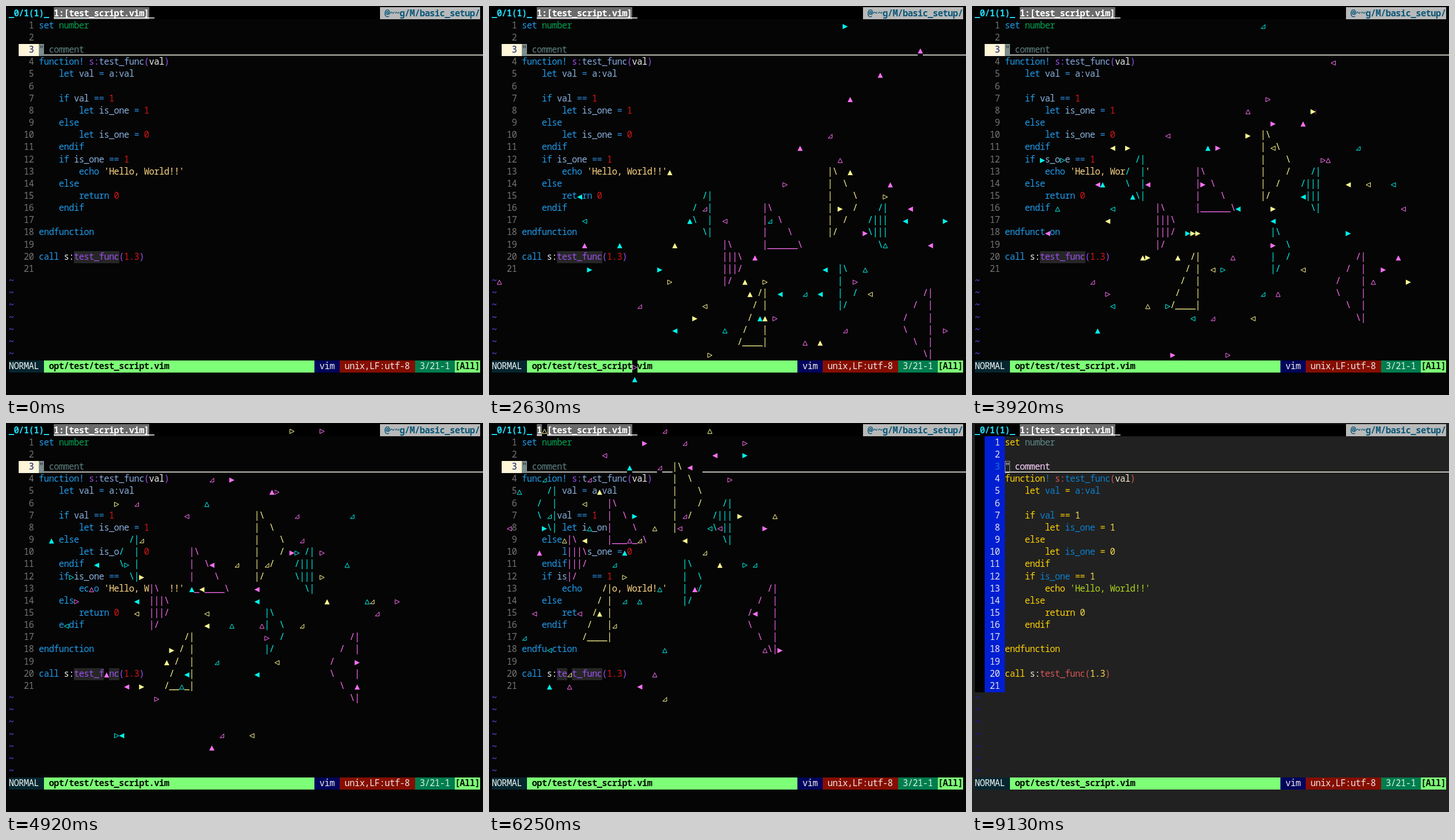
Write an HTML page with a canvas that moves like this. It is 829 by 676 pixels and loops after 9.18 s.

```html
<!DOCTYPE html>
<html>
<head>
<meta charset="utf-8">
<style>
html, body { margin: 0; width: 100%; height: 100%; overflow: hidden; background: #050505; }
canvas { display: block; }
</style>
</head>
<body>
<canvas id="stage" width="829" height="676"></canvas>
<script>
const ctx = document.getElementById('stage').getContext('2d');
const LOOP = 9180, TYPE_COLON = 1220, TYPE_U = 1340, START = 1750, END = 6750, BLUR = 8900;
const COLS = 94, ROWS = 32, CW = 8.71, RH = 21.16;
const X = c => Math.round(5 + CW * c), Y = r => Math.round(2.3 + RH * r);

// "~" starts a token; the next letter names its style
const code = [
  '~Kset ~Onumber', '', '~C" comment',
  '~Kfunction~B! ~Ss:~Ftest_func~P(~Aval~P)',
  '~K    let ~Vval ~E= ~Va:val', '',
  '~K    if ~Vval ~E== ~N1',
  '~K        let ~Vis_one ~E= ~N1',
  '~K    else',
  '~K        let ~Vis_one ~E= ~N0',
  '~K    endif',
  '~K    if ~Vis_one ~E== ~N1',
  "~K        echo ~T'Hello, World!!'",
  '~K    else',
  '~K        return ~N0',
  '~K    endif', '',
  '~Kendfunction', '',
  '~Kcall ~As:~Mtest_func~P(~N1.3~P)', ''
];
const dark = {
  bg: '#050505', num: '#747474', numBg: '#050505', curNum: '#101c78', curBg: '#fff5d7',
  tilde: '#6050ff', mark: '#262626', K: '#209ae8', O: '#04a052', C: '#5f7f80', B: '#209ae8',
  S: '#9b50ee', F: '#86a8de', P: '#9b50ee', A: '#ededed', V: '#8ab0dc', E: '#2a8fe4',
  N: '#d41616', T: '#ffd787', M: '#9b50ee'
};
const blue = {
  bg: '#212121', num: '#e6e6e6', numBg: '#001ed2', curNum: '#0b78e0', curBg: '#001ed2',
  tilde: '#1414c8', mark: '#212121', K: '#fdd000', O: '#5f8787', C: '#ffd7ff', B: '#0a80d0',
  S: '#d75555', F: '#0a80d0', P: '#d75555', A: '#f2ead0', V: '#0a80d0', E: '#fdd000',
  N: '#f5d84a', T: '#afd71c', M: '#d75555'
};
const ink = { C: '#00f6ee', M: '#ff70f5', Y: '#fffb92' };

// large outlines: colour, column, row, lines
const outlines = [
  ['C', 36, 14, ['  /|', '/  |', '\\  |', '  \\|']],
  ['Y', 63, 12, ['|\\    ', '|  \\  ', '|    \\', '|    /', '|  /  ', '|/    ']],
  ['C', 71, 15, ['  /|', '/|||', '\\|||', '  \\|']],
  ['M', 50, 15, ['|\\      ', '|  \\    ', '|    \\  ', '|______\\']],
  ['M', 42, 18, ['|\\  ', '|||\\', '|||/', '|/  ']],
  ['C', 65, 20, ['|\\  ', '|  \\', '|  /', '|/  ']],
  ['Y', 45, 22, ['    /|', '   / |', '  /  |', ' /   |', '/____|']],
  ['M', 78, 22, ['    /|', '  /  |', '/    |', '\\    |', '  \\  |', '    \\|']]
];

// small triangles by row: column, colour, glyph
const confetti = {
  2: '65C◁', 4: '76M◿ 81M▷', 8: '67M▲', 9: '63M△', 10: '53M△', 11: '34Y◀ 68M▶',
  12: '57Y◀ 88Y▷', 13: '58M▶ 67Y▲ 74M◁', 14: '17C▷ 71M◁ 74Y▲',
  15: '33Y◀ 34C◿ 44M△ 64Y◀ 82Y△ 93C◿', 16: '18C▷ 41M◁ 52C▶ 86C▲',
  17: '25C▲ 51M△ 77M◿', 18: '72C◁ 90M▲',
  19: '0M◿ 15C◁ 29Y◀ 30M▷ 60C▶ 69M▷ 70C◀ 78C◁', 20: '19M▶ 32C▲ 50C▲',
  21: '47Y▷ 48Y▷ 83M◿', 22: '38Y◁ 53Y△ 58C▶ 70Y△ 92Y▶', 23: '26M◀ 56M◿',
  24: '47Y▶ 52M◁ 65C▷ 66M▶ 85M◿', 25: '33C▷ 37Y◀', 26: '91M△',
  27: '26M▲ 48C◿ 59Y▶', 28: '36Y◀ 41C◁', 29: '46M◀', 30: '27C◿', 31: '62M△'
};
const MID_COL = 60, MID_ROW = 18;
const GLYPHS = '◁▷△◿◀▶▲';
const points = {
  '◀': [4.5, -4.5, 4.5, 4.5, -4.5, 0], '▶': [-4.5, -4.5, -4.5, 4.5, 4.5, 0],
  '▲': [-4.5, 4.5, 4.5, 4.5, 0, -4.5], '◿': [-4, 4, 4, 4, 4, -4]
};
const solid = { '◁': '◀', '▷': '▶', '△': '▲', '◿': '◿' };

const rnd = (i, k) => {
  const v = Math.sin(i * 127.1 + k * 311.7) * 43758.5453;
  return v - Math.floor(v);
};
const bits = Object.entries(confetti).flatMap(([row, list]) => list.split(' ').map(s => {
  const [, col, tint, glyph] = s.match(/(\d+)(\w)(.)/);
  return { col: +col, row: +row, tint, glyph };
}));

function box(c, r, n, color) {
  ctx.fillStyle = color;
  ctx.fillRect(X(c), Y(r), X(c + n) - X(c), Y(r + 1) - Y(r));
}

function put(c, r, text, fg, bg, bold) {
  if (bg) box(c, r, text.length, bg);
  ctx.fillStyle = fg;
  ctx.font = `${bold ? '600 ' : ''}15.5px "Noto Sans Mono", "DejaVu Sans Mono", monospace`;
  ctx.textAlign = 'center';
  [...text].forEach((ch, i) => {
    if (ch !== ' ') ctx.fillText(ch, 5 + CW * (c + i + 0.5), 17.6 + RH * r);
  });
}

function line(x, y, w, color) {
  ctx.fillStyle = color;
  ctx.fillRect(x, y, w, 1.5);
}

function drawBars() {
  box(0, 0, COLS, '#000');
  put(0, 0, '_0/1(1)_', '#22d8f4', null, true);
  put(9, 0, '1:[test_script.vim]', '#fff', '#6b6b6b', true);
  line(X(9), 20, X(29) - X(9), '#fff');
  put(74, 0, ' @~~g/M/basic_setup/', '#0b5878', '#b9b9b9', true);
  put(0, 29, 'NORMAL ', '#e8f4f4', '#06262f');
  put(7, 29, ' opt/test/test_script.vim'.padEnd(54), '#061006', '#7dff77', true);
  put(61, 29, ' vim ', '#f0f0f0', '#00045c');
  put(66, 29, ' unix,LF:utf-8 ', '#f0e4e0', '#850e00');
  put(81, 29, ' 3/21-1 ', '#d8f4e4', '#007d4e');
  put(89, 29, '[All]', '#061006', '#7dff77', true);
}

function drawBuffer(pal) {
  code.forEach((src, i) => {
    const row = i + 1, current = row === 3;
    if (pal === blue) box(0, row, 2, '#000');
    put(2, row, String(row).padStart(3) + ' ', current ? pal.curNum : pal.num,
      current ? pal.curBg : pal.numBg);
    let col = 6;
    src.split('~').slice(1).forEach(tok => {
      const text = tok.slice(1);
      put(col, row, text, pal[tok[0]], tok[0] === 'M' ? pal.mark : null);
      col += text.length;
    });
  });
  line(pal === dark ? X(2) : X(6), 84.5, 829, '#f6f6ec');
  for (let r = 22; r < 29; r++) put(0, r, '~', pal.tilde);
}

function drawCursor(t) {
  const typed = t < TYPE_COLON || t >= START ? '' : t < TYPE_U ? ':' : ':U';
  if (typed) {
    put(0, 30, typed, '#e4e4e4');
    box(typed.length, 30, 1, '#7c8c8c');
  } else if (t < BLUR) {
    put(6, 3, '"', '#1c2828', '#7c8c8c');
  } else {
    ctx.strokeStyle = '#8a9a9a';
    ctx.lineWidth = 1;
    ctx.strokeRect(X(6) + 0.5, Y(3) + 0.5, 8, 20);
  }
}

function triangle(c, r, glyph, color) {
  box(c, r, 1, dark.bg);
  const p = points[solid[glyph] || glyph], k = solid[glyph] ? 0.85 : 1;
  const cx = 5 + CW * (c + 0.5), cy = 14.5 + RH * r;
  ctx.beginPath();
  for (let i = 0; i < 6; i += 2) ctx.lineTo(cx + p[i] * k, cy + p[i + 1] * k);
  ctx.closePath();
  ctx.fillStyle = ctx.strokeStyle = color;
  ctx.lineWidth = 1;
  if (solid[glyph]) ctx.stroke(); else ctx.fill();
}

// sum of random -1, 0, +1 steps, zero at step 0
function wander(id, step) {
  let sum = 0;
  for (let k = 0; k < Math.abs(step); k++) {
    sum += Math.floor(rnd(id, step < 0 ? -1 - k : k + 1) * 3) - 1;
  }
  return sum;
}

function drawShapes(t) {
  const step = Math.floor(0.5 + (t < 4920 ? (t - 3130) / 128 : 14 + (t - 4920) / 102));
  const rise = Math.round(step / 3);
  for (const [tint, col, row, lines] of outlines) {
    lines.forEach((s, i) => put(col - step, row - rise + i, s, ink[tint], dark.bg));
  }
  // the small triangles close in on the middle while they drift
  const spread = 1 - step * 0.012;
  bits.forEach((b, i) => {
    const c = MID_COL - step + Math.round((b.col - MID_COL) * spread) + wander(i + 1, step);
    const r = MID_ROW - rise + Math.round((b.row - MID_ROW) * spread) + wander(i + 201, step);
    if (c < 0 || c >= COLS || r < 0 || r >= ROWS) return;
    triangle(c, r, step ? GLYPHS[Math.floor(rnd(i + 401, step) * 7)] : b.glyph, ink[b.tint]);
  });
}

function draw(t) {
  const pal = t < END ? dark : blue;
  ctx.fillStyle = pal.bg;
  ctx.fillRect(0, 0, 829, 676);
  drawBars();
  drawBuffer(pal);
  drawCursor(t);
  if (t >= START && t < END) drawShapes(t);
}

const began = performance.now();
function tick() {
  draw((performance.now() - began) % LOOP);
  requestAnimationFrame(tick);
}
tick();
</script>
</body>
</html>
```
